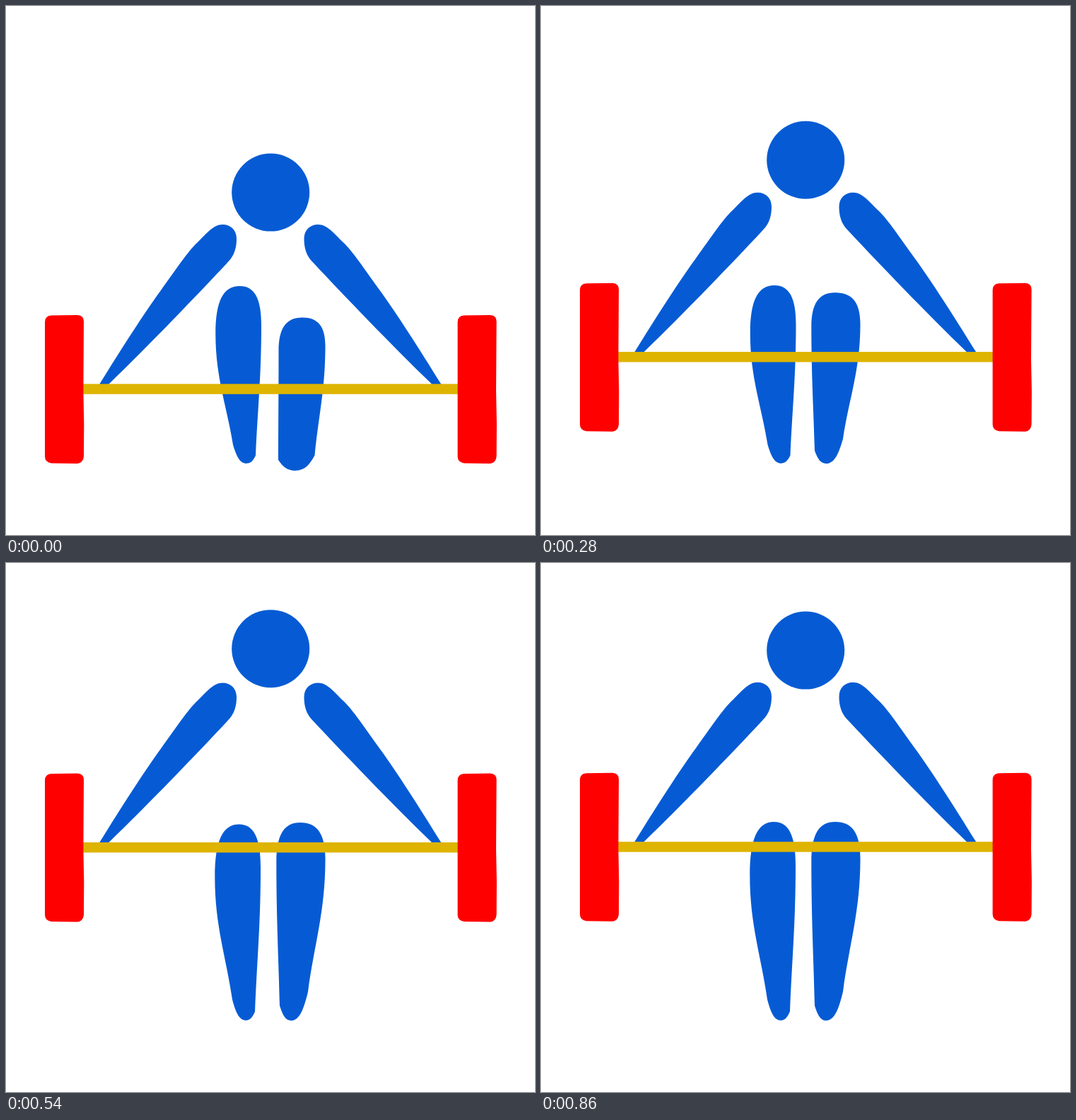
An HTML page with a canvas for the animation above (900 ms loop, 748x748 px).

```html
<!DOCTYPE html>
<html>
<head>
<meta charset="utf-8">
<title>Weightlifter</title>
<style>
html, body { margin: 0; width: 100%; height: 100%; overflow: hidden; background: #fff; }
canvas { display: block; width: 748px; height: 748px; }
</style>
</head>
<body>
<canvas id="stage" width="748" height="748"></canvas>
<script>
const ctx = document.getElementById('stage').getContext('2d');
const BLUE = '#065bd4', RED = '#f00', GOLD = '#deb400';
const LOOP = 900, STEP = 20, LAST = 860;

// Key poses: time, bar lift, head lift, rise of the right knee.
const keys = [
  [0, 0, 0, 0],
  [100, 14, 19.5, 10.5],
  [200, 35, 36.5, 30.5],
  [360, 57.5, 57.5, 40],
  [460, 104, 107, 60],
  [560, 142, 145, 74.5],
  [640, 130, 133.5, 74.5],
  [LAST, 140.2, 140, 74.5]
];

// Legs: knee x, toe x, then x and relative height of left side, left ankle, right side, right ankle.
const leftLeg = [329.5, 339, 295.3, 0.27, 320, 0.895, 360, 0.22, 352, 0.955];
const rightLeg = [416, 403, 382.3, 0.2, 387, 0.925, 451.5, 0.185, 427, 0.855];
const crouchedLeg = [419, 409, 385.5, 0.22, 385, 0.93, 451.5, 0.185, 436.5, 0.9];

const arm = new Path2D('M132 535C165 482 195 435 219 402C240 373 257 347 271 334' +
  'C285 320 294 309 306 309C318 309 326 317 326 329C326 348 319 357 313 363C270 409 203 479 145 535Z');
const plate = new Path2D('M55 447Q55 438 64 437.5L101 437Q110 437.5 110 446L109.4 545' +
  'L110.3 590L110 637Q109 646 101 647L64 646.5Q55 645 55 637Z');

const mix = (a, b, u) => a + (b - a) * u;
const clamp = u => Math.max(0, Math.min(1, u));

// Monotone cubic interpolation of one column of the key poses.
function sample(column, t) {
  const last = keys.length - 2;
  let i = 0;
  while (i < last && t > keys[i + 1][0]) i++;
  const slope = k => (keys[k + 1][column] - keys[k][column]) / (keys[k + 1][0] - keys[k][0]);
  const tangent = k => {
    if (k === 0 || k > last) return slope(Math.min(k, last));
    const a = slope(k - 1), b = slope(k);
    return a * b > 0 ? 2 * a * b / (a + b) : 0;
  };
  const span = keys[i + 1][0] - keys[i][0], u = (t - keys[i][0]) / span, v = 1 - u;
  return keys[i][column] * (1 + 2 * u) * v * v + keys[i + 1][column] * (3 - 2 * u) * u * u +
    span * u * v * (tangent(i) * v - tangent(i + 1) * u);
}

// Both halves run from knee to toe and share the same curve rule.
function drawLeg([knee, toe, ...sides], kneeY, footY, shift = 0) {
  const half = (side, sideAt, ankle, ankleAt) => {
    const curve = (...p) => ctx.bezierCurveTo(
      ...p.map((v, i) => i % 2 ? mix(kneeY, footY, v) : v + shift));
    ctx.moveTo(knee + shift, kneeY);
    curve(mix(knee, side, 0.68), 0, side, 0.31 * sideAt, side, sideAt);
    curve(side, mix(sideAt, ankleAt, 0.4), mix(ankle, side, 0.35), mix(ankleAt, sideAt, 0.35),
      ankle, ankleAt);
    curve(mix(ankle, toe, 0.25), mix(ankleAt, 1, 0.6), mix(toe, ankle, 0.5), 1, toe, 1);
    // Overlap the centre line so that no seam shows.
    const inner = (knee + toe) / 2 + shift + Math.sign(knee - side) * 4;
    ctx.lineTo(inner, mix(kneeY, footY, 0.97));
    ctx.lineTo(inner, mix(kneeY, footY, 0.03));
  };
  for (const i of [0, 4]) {
    ctx.beginPath();
    half(...sides.slice(i, i + 4));
    ctx.fill();
  }
}

function draw(t) {
  const [bar, head, rise] = [1, 2, 3].map(column => sample(column, t));
  const crouch = clamp(1 - t / 130);
  const right = rightLeg.map((v, i) => mix(v, crouchedLeg[i], crouch));
  const leftRise = 30 * clamp((t - 200) / 360) ** 2.2;

  ctx.fillStyle = '#fff';
  ctx.fillRect(0, 0, 748, 748);

  ctx.fillStyle = BLUE;
  ctx.beginPath();
  ctx.arc(374.2, 263.6 - head, 55, 0, 2 * Math.PI);
  ctx.fill();
  drawLeg(leftLeg, 396 - leftRise, 646.7, clamp(1 - t / 560));
  drawLeg(right, 440.5 - rise, 647 + 10 * clamp(1 - t / 250));

  ctx.save();
  ctx.translate(0, -bar);
  ctx.fill(arm);
  ctx.save();
  ctx.translate(747.5, 0);
  ctx.scale(-1, 1);
  ctx.fill(arm);
  ctx.restore();
  ctx.fillStyle = GOLD;
  ctx.fillRect(108, 534.4, 532, 14.4);
  ctx.fillStyle = RED;
  ctx.fill(plate);
  ctx.translate(583.6, 0);
  ctx.fill(plate);
  ctx.restore();
}

function tick() {
  const t = performance.now() % LOOP;
  draw(Math.min(LAST, Math.floor(t / STEP) * STEP));
  requestAnimationFrame(tick);
}
tick();
</script>
</body>
</html>
```
